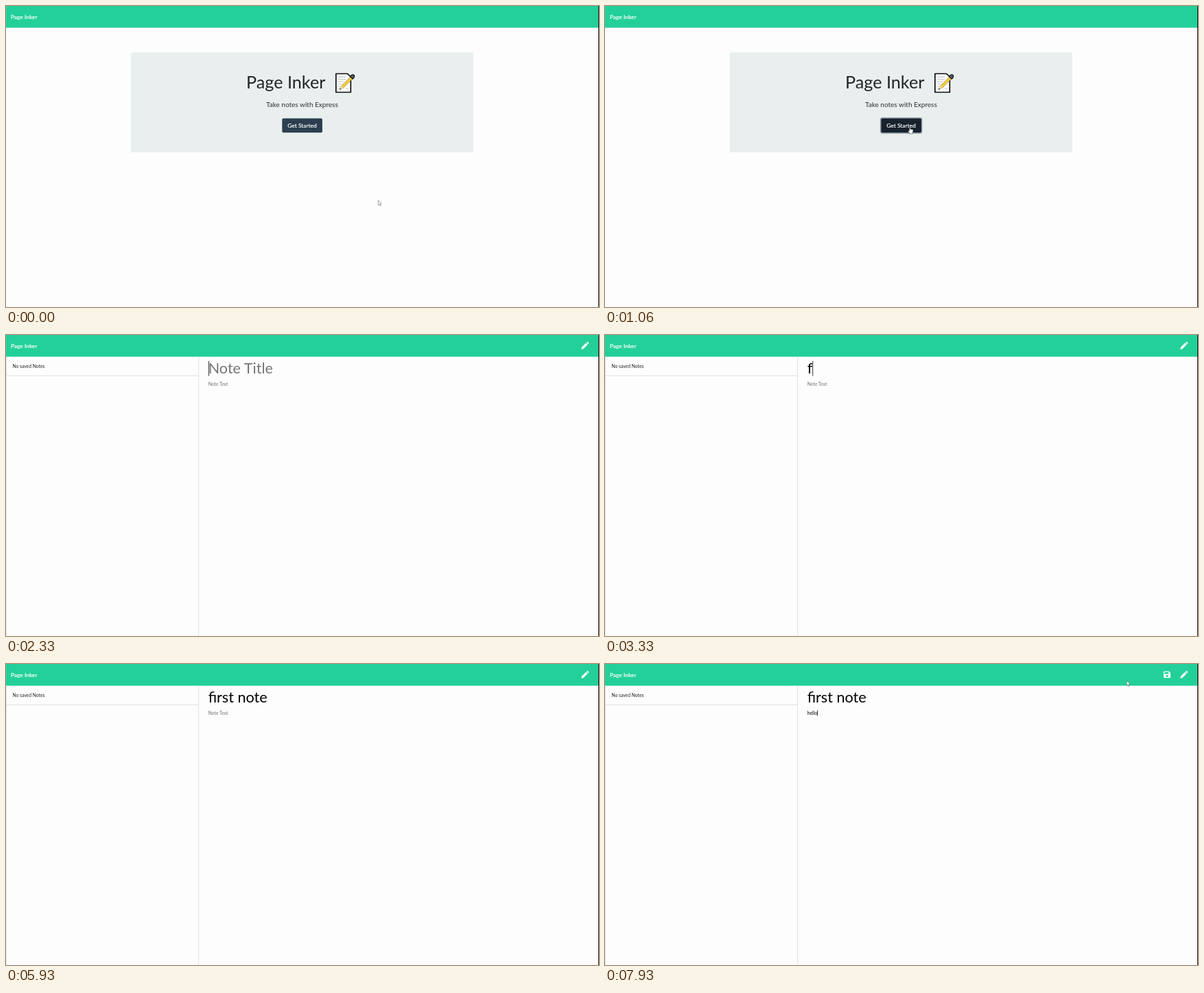
Recreate the animation shown at these times as an HTML page. Size 864x438 px, loop 8 s.

```html
<!DOCTYPE html>
<html lang="en">
<head>
<meta charset="utf-8">
<title>Notes</title>
<style>
  html, body { margin: 0; width: 100%; height: 100%; overflow: hidden; background: #fdfdfd; }
  svg { display: block; width: 100%; height: 100%; }
  text { font-family: Lato, sans-serif; white-space: pre; }
  .small { font-size: 6.75px; }
  .title { font-size: 21.6px; }
  .light { font-size: 8.44px; fill: #fff; stroke: #fff; stroke-width: .2px; }
  .hint { fill: #757575; }
</style>
</head>
<body>
<svg viewBox="0 0 864 438">
  <rect width="864" height="438" fill="#fdfdfd"/>
  <rect width="864" height="31.6" fill="#23d09a"/>
  <text class="light" x="6.9" y="18.7">Page Inker</text>

  <g id="home">
    <rect x="182" y="67.5" width="499" height="145.5" rx="2" fill="#e9efee"/>
    <text x="350" y="120.3" font-size="25.2" fill="#212529">Page Inker</text>
    <g stroke-linejoin="round">
      <path d="M480.8 98.5H497.5L502.3 103.2V125.5H480.8Z" fill="#fff" stroke="#0b0b0b" stroke-width="1.7"/>
      <path d="M484 103.3H495M484 106.7H495M484 110.1H492M484 113.5H489M484 116.9H487M484 120.3H486M495 120.3H499" stroke="#b3b7b8" stroke-width=".9"/>
      <path d="M486.4 121.4L488.6 116.4L502 103L504.8 105.8L491.4 119.2Z" fill="#f6cf3e" stroke="#5b4c1c" stroke-width=".5"/>
      <path d="M486.4 121.4L488.6 116.4L491.4 119.2Z" fill="#f3d9b0"/>
      <path d="M486 121.8L486.9 119.7L488.2 121Z" fill="#0b0b0b"/>
      <path d="M501.4 102.6L503.4 100.6Q505.4 99.2 507.1 100.7Q508.6 102.4 507.1 104.2L505 106.2Z" fill="#5a5e64" stroke="#0b0b0b" stroke-width="1.2"/>
    </g>
    <text x="431.4" y="146.6" font-size="10" fill="#2b2f33" text-anchor="middle">Take notes with Express</text>
    <rect id="ring" x="401.6" y="162.9" width="60" height="22.1" rx="2.4" fill="none" stroke="#8b98a5" stroke-width="1.4"/>
    <rect id="button" x="402.3" y="163.6" width="58.6" height="20.7" rx="1.8"/>
    <text class="light" x="431.5" y="177" text-anchor="middle">Get Started</text>
  </g>

  <g id="editor">
    <path d="M.4 31.6V438M280.6 31.6V438M0 59.4H281" fill="none" stroke="#dedfdf" stroke-width=".9"/>
    <text class="small" x="9.4" y="48" fill="#212529">No saved Notes</text>
    <text class="title" id="title" x="294.7" y="56.4"/>
    <text class="small" id="body" x="294.7" y="74.1"/>
    <rect id="caret" width=".9" fill="#222"/>
    <g fill="#f1fbf7">
      <path id="save" fill-rule="evenodd" d="M815 10.4H821.4L824 13V19.2Q824 20.3 822.9 20.3H815Q813.9 20.3 813.9 19.2V11.5Q813.9 10.4 815 10.4ZM815.3 11.8V14.5H820.8V11.8ZM818.9 16A1.5 1.5 0 1 0 818.9 19A1.5 1.5 0 1 0 818.9 16Z"/>
      <path d="M838.2 20.9L838.8 17.8L845 11.6L847.5 14.1L841.3 20.3ZM845.6 11L846.4 10.2Q847.2 9.5 848 10.2L848.9 11.1Q849.6 11.9 848.9 12.7L848.1 13.5Z"/>
    </g>
  </g>

  <rect x="863" width="1" height="438" fill="#161616"/>
  <path id="arrow" d="M0 0V7L1.6 5.6L2.7 8L3.8 7.5L2.8 5.2H4.8Z" fill="#fff" stroke="#555" stroke-width=".55"/>
  <path id="hand" d="M1.9 6.2V.9Q2.6 0 3.3 .9V3.6L6.5 4.2Q7.6 4.5 7.5 5.6L7 8.3L6.4 10.5H2.8L.3 6.9Q.1 5.9 1 5.8Z" fill="#fff" stroke="#333" stroke-width=".6" stroke-linejoin="round"/>
</svg>
<script>
const LOOP = 8000, STEP = 1000 / 15, BLINK = 530;
const PAGE = 1130, FOCUS = 2330, TAB = 5400, SAVE = 6200, RETURN = 7930;
const titleKeys = [3330, 3460, 3800, 3930, 4130, 4400, 4660, 4730, 4860, 4930];
const bodyKeys = [6130, 6260, 6400, 6600, 6860];
const el = {};
document.querySelectorAll('[id]').forEach(n => el[n.id] = n);

const clamp = v => Math.max(0, Math.min(1, v));
const ramp = (t, from, to) => clamp((t - from) / (to - from));
const ease = p => p * p * (3 - 2 * p);
const lerp = (a, b, p) => a + (b - a) * p;
const mix = (a, b, p) => `rgb(${a.map((v, i) => Math.round(lerp(v, b[i], p)))})`;
const show = (node, on) => node.setAttribute('display', on ? 'inline' : 'none');
const place = (node, x, y) => node.setAttribute('transform', `translate(${x} ${y})`);

// Returns the x position of the caret.
function type(node, text, hint, keys, t) {
  const count = keys.filter(k => k <= t).length;
  node.textContent = count ? text.slice(0, count) : hint;
  node.classList.toggle('hint', !count);
  return count ? 294.7 + node.getComputedTextLength() : 295;
}

function drawHome(t) {
  const hover = ramp(t, 520, 660), press = ramp(t, 800, 960);
  el.button.setAttribute('fill', mix([44, 62, 80], [23, 34, 45], hover * .6 + press * .4));
  el.ring.setAttribute('opacity', press);
}

function drawEditor(t) {
  const titleEnd = type(el.title, 'first note', 'Note Title', titleKeys, t);
  const bodyEnd = type(el.body, 'hello', 'Note Text', bodyKeys, t);
  const inBody = t >= TAB;
  const lastInput = Math.max(...[FOCUS, TAB, ...titleKeys, ...bodyKeys].filter(k => k <= t));
  show(el.caret, t >= FOCUS && Math.floor((t - lastInput) / BLINK) % 2 === 0);
  el.caret.setAttribute('x', inBody ? bodyEnd : titleEnd);
  el.caret.setAttribute('y', inBody ? 67.3 : 37.8);
  el.caret.setAttribute('height', inBody ? 8.2 : 21.8);
  show(el.save, t >= SAVE);
}

function drawPointer(t) {
  const p = ease(ramp(t, 0, 660));
  const x = lerp(542.3, 443.3, p), y = lerp(282.8, 175.5, p);
  const overButton = y < 184, back = t >= RETURN;
  show(el.arrow, !overButton || back);
  show(el.hand, overButton && t < 1730);
  place(el.hand, x - 1.8, y);
  place(el.arrow, back ? 760.2 : x, back ? 24.3 : y);
}

function draw(now) {
  // Whole steps at 15 per second, a hair early to absorb rounding.
  const t = Math.floor((now % LOOP + 7) / STEP) * STEP % LOOP + 1;
  show(el.home, t < PAGE);
  show(el.editor, t >= PAGE);
  if (t < PAGE) drawHome(t);
  else drawEditor(t);
  drawPointer(t);
}

let start;
function tick(now) {
  start ??= now;
  draw(now - start);
  requestAnimationFrame(tick);
}
draw(0);
requestAnimationFrame(tick);
</script>
</body>
</html>
```
